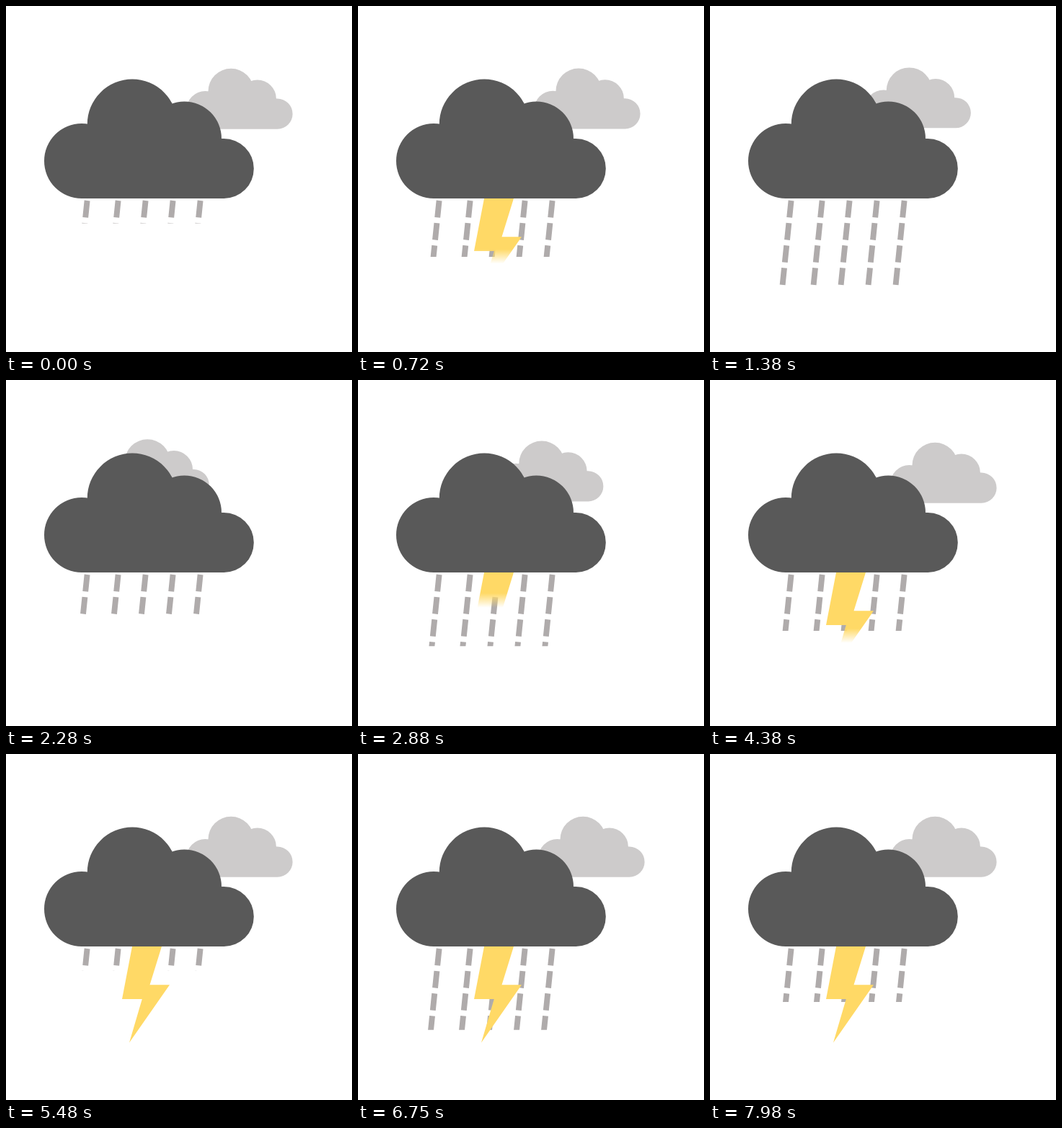
These frames come from a looping animation (480 by 480 pixels, 8 s). An HTML page with a canvas:

```html
<!DOCTYPE html>
<html lang="en">
<head>
<meta charset="utf-8">
<title>Storm cloud</title>
<style>
  html, body { margin: 0; width: 100%; height: 100%; overflow: hidden; background: #fff; }
  canvas { display: block; width: 480px; height: 480px; }
</style>
</head>
<body>
<canvas id="stage" width="480" height="480"></canvas>
<script>
const ctx = document.getElementById("stage").getContext("2d");

const LOOP = 8000;
const RAIN = { period: 1830, lead: 114, from: 294.2, to: 412 };
const BOLT = { period: 455, repeats: 10, top: 261, travel: 165, fade: 20 };
const DRIFT = { turn: 2280, span: 2020, x: -116, y: -4.5 };

const lobes = [[105, 215, 52], [175.2, 164, 62.4], [247.5, 184, 51.5], [302.3, 225.5, 41.5]];
const boltShape = [[175, 267], [216, 267], [199.5, 320.3], [227, 320.3], [171, 400.5], [188.8, 340], [161, 340]];
const dropX = [112.6, 155.6, 193.6, 231.6, 269.6];

function cloud(color, x, y, scale) {
  ctx.save();
  ctx.translate(x, y);
  ctx.scale(scale, scale);
  ctx.fillStyle = color;
  ctx.beginPath();
  for (const [cx, cy, r] of lobes) {
    ctx.moveTo(cx + r, cy);
    ctx.arc(cx, cy, r, 0, Math.PI * 2);
  }
  ctx.rect(105, 184, 197.3, 83);
  ctx.rect(113, 164, 112, 60);
  ctx.fill();
  ctx.restore();
}

// Dashed slanted lines, uncovered from the top.
function rain(t) {
  const phase = ((t + RAIN.lead) % RAIN.period) / RAIN.period;
  ctx.save();
  ctx.beginPath();
  ctx.rect(0, 0, 480, RAIN.from + (RAIN.to - RAIN.from) * phase);
  ctx.clip();
  ctx.strokeStyle = "#afabab";
  ctx.lineWidth = 7.9;
  ctx.setLineDash([23.5, 7.8]);
  ctx.beginPath();
  for (const x of dropX) {
    ctx.moveTo(x, 270);
    ctx.lineTo(x - 14.45, 411);
  }
  ctx.stroke();
  ctx.restore();
}

// Repeated soft wipe, then the bolt stays.
function bolt(t) {
  const cycle = t / BOLT.period;
  const phase = cycle < BOLT.repeats ? cycle % 1 : 1;
  const edge = BOLT.top + BOLT.travel * phase;
  const fill = ctx.createLinearGradient(0, edge - BOLT.fade, 0, edge);
  fill.addColorStop(0, "rgba(255,217,102,1)");
  fill.addColorStop(1, "rgba(255,217,102,0)");
  ctx.fillStyle = fill;
  ctx.beginPath();
  for (const [x, y] of boltShape) ctx.lineTo(x, y);
  ctx.closePath();
  ctx.fill();
}

function draw(t) {
  ctx.fillStyle = "#fff";
  ctx.fillRect(0, 0, 480, 480);
  const drift = Math.max(0, 1 - Math.abs(t - DRIFT.turn) / DRIFT.span) ** 2;
  cloud("#cdcbcb", 223.3 + DRIFT.x * drift, 35.3 + DRIFT.y * drift, 0.507);
  rain(t);
  bolt(t);
  cloud("#595959", 0, 0, 1);
}

function tick() {
  draw(performance.now() % LOOP);
  requestAnimationFrame(tick);
}
tick();
</script>
</body>
</html>
```
